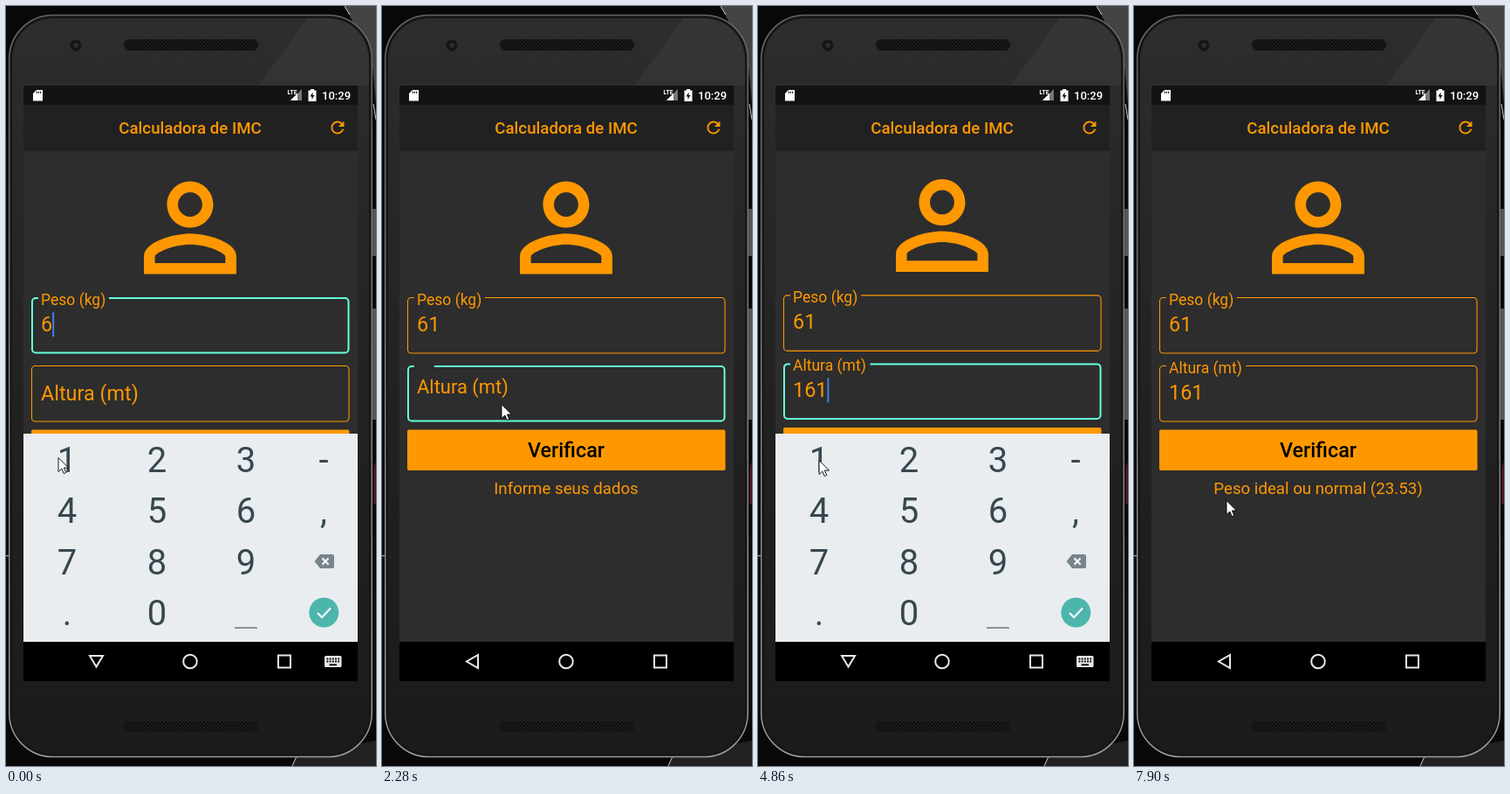
Recreate the animation shown at these times as an HTML page. Size 424 by 869 pixels, loop 8000 ms.

```html
<!DOCTYPE html>
<html lang="pt">
<head>
<meta charset="utf-8">
<title>Calculadora de IMC</title>
<style>
html, body { margin: 0; width: 100%; height: 100%; overflow: hidden; background: #080808; }
svg { display: block; }
text { font-family: Roboto, sans-serif; white-space: pre; }
.orange { fill: #ff9800; }
.big { font-size: 23.4px; }
.mid { font-size: 18.7px; }
.medium { font-weight: 500; }
.center, #keys text { text-anchor: middle; }
.line { fill: none; stroke: #e8e8e8; stroke-width: 2; }
#keys text { font-size: 40px; fill: #37474f; }
</style>
</head>
<body>
<svg width="424" height="869" viewBox="0 0 424 869">
  <defs>
    <linearGradient id="shell" x1="0" y1="0" x2="0" y2="1">
      <stop offset="0" stop-color="#2d2d2d"/>
      <stop offset=".5" stop-color="#222"/>
      <stop offset="1" stop-color="#1b1b1b"/>
    </linearGradient>
    <linearGradient id="rim" x1="0" y1="0" x2="0" y2="1">
      <stop offset="0" stop-color="#666"/>
      <stop offset="1" stop-color="#999"/>
    </linearGradient>
    <pattern id="mesh" width="4" height="4" patternUnits="userSpaceOnUse">
      <rect width="4" height="4" fill="#1c1c1c"/>
      <circle cx="1" cy="1" r="1" fill="#080808"/>
      <circle cx="3" cy="3" r="1" fill="#080808"/>
    </pattern>
  </defs>

  <!-- backdrop and phone -->
  <path d="M388 0H424V112L419 60Z" fill="#444"/>
  <path d="M333 858L328 869H424V840Z" fill="#222"/>
  <path d="M388 0L394 10M421 112L424 130M333 858L328 869M0 629L4 628" stroke="#ccc" fill="none"/>
  <path d="M421 530L424 520V570H421Z" fill="#4a1420"/>
  <path d="M420 232h4v54h-4zM420 346h4v127h-4z" fill="#555"/>
  <rect x="3.7" y="10.5" width="415.5" height="848" rx="50" fill="#161616" stroke="url(#rim)" stroke-width="1.5"/>
  <rect x="7" y="14" width="409" height="841" rx="47" fill="url(#shell)"/>
  <path d="M345 14L290 91H416V61Q410 16 369 14Z" fill="#fff" opacity=".04"/>
  <circle cx="80" cy="45" r="6.5" fill="#151515"/>
  <circle cx="80" cy="45" r="3" fill="#2c2c2c"/>
  <rect x="135" y="38" width="154" height="13" rx="6" fill="url(#mesh)"/>
  <rect x="135" y="818" width="154" height="12" rx="6" fill="url(#mesh)"/>

  <!-- app -->
  <rect x="20" y="91" width="383" height="681" fill="#2d2d2d"/>
  <g id="content">
    <path class="orange" fill-rule="evenodd" transform="translate(131.5 174) scale(6.625)" d="M12 5.9c1.16 0 2.1.94 2.1 2.1s-.94 2.1-2.1 2.1S9.9 9.16 9.9 8s.94-2.1 2.1-2.1m0 9c2.97 0 6.1 1.46 6.1 2.1v1.1H5.9V17c0-.64 3.13-2.1 6.1-2.1M12 4C9.79 4 8 5.79 8 8s1.79 4 4 4 4-1.79 4-4-1.79-4-4-4zm0 9c-2.67 0-8 1.34-8 4v3h16v-3c0-2.66-5.33-4-8-4z"/>
    <g id="weight"></g>
    <g id="height"></g>
    <rect class="orange" x="29" y="484.5" width="364.5" height="46.5" rx="2"/>
    <text class="big medium center" x="211" y="516">Verificar</text>
    <text id="result" class="mid orange center" x="211" y="558"></text>
  </g>

  <rect x="20" y="113" width="383" height="52.5" fill="#212121"/>
  <text class="mid medium orange center" x="211" y="146">Calculadora de IMC</text>
  <path class="orange" transform="translate(368.8 127.8) scale(.932)" d="M17.65 6.35C16.2 4.9 14.21 4 12 4c-4.42 0-7.99 3.58-7.99 8s3.57 8 7.99 8c3.73 0 6.84-2.55 7.73-6h-2.08c-.82 2.33-3.04 4-5.65 4-3.31 0-6-2.69-6-6s2.69-6 6-6c1.66 0 3.14.69 4.22 1.78L13 11h7V4l-2.35 2.35z"/>

  <!-- status bar -->
  <rect x="20" y="91" width="383" height="22" fill="#131313"/>
  <path d="M35 96H42V108.500H31V100Z" fill="#fff"/>
  <path d="M35.500 97.500v2.500M37.500 97.500v2.500M39.500 97.500v2.500" stroke="#131313"/>
  <path d="M339 95V108H326Z" fill="#777"/>
  <path d="M334 100V108H326Z" fill="#fff"/>
  <text x="322.500" y="100.500" font-size="6.800" font-weight="700" fill="#fff">LTE</text>
  <path d="M349 95h4v1.500h2.500V109h-9V96.500h2.500Z" fill="#fff"/>
  <path d="M351.500 98.500L348.500 103.500H350.500V107L353.500 102H351.500Z" fill="#131313"/>
  <text class="medium" x="362" y="107" font-size="13.050" fill="#fff">10:29</text>

  <!-- keyboard -->
  <svg x="20" y="489" width="383" height="238" viewBox="20 489 383 238">
    <g id="keyboard">
      <rect x="20" y="489" width="383" height="238" fill="#e9edf0"/>
      <g id="keys"></g>
      <path d="M262 711h26" stroke="#8b969b" stroke-width="2"/>
      <path d="M360 627H374Q376 627 376 629V641Q376 643 374 643H360L353.500 635Z" fill="#78868c"/>
      <path d="M362.500 631.500l7 7M369.500 631.500l-7 7" stroke="#fff" stroke-width="2"/>
      <circle id="done" cx="364.300" cy="693.500" r="17"/>
      <path d="M357 694l5 5 10-10.500" fill="none" stroke="#fff" stroke-width="2"/>
    </g>
  </svg>

  <!-- navigation bar -->
  <rect x="20" y="727" width="383" height="45"/>
  <path id="back" class="line"/>
  <circle class="line" cx="211" cy="749.500" r="7.800"/>
  <rect class="line" x="312" y="742.500" width="14" height="14"/>
  <g id="imeIcon">
    <rect x="365" y="743" width="19.500" height="13" rx="1.500" fill="#e8e8e8"/>
    <path d="M367.500 746.500h15M367.500 749.500h15" stroke="#000" stroke-width="1.800" stroke-dasharray="1.800 1.400"/>
    <path d="M370.500 753.300h8.500" stroke="#000" stroke-width="1.800"/>
  </g>

  <path id="mouse" d="M0 .5V16.500L3.800 13L6.200 18.600L8.800 17.500L6.400 12H11.500Z" fill="#fff" stroke="#000" stroke-width=".9"/>
</svg>
<script>
const $ = id => document.getElementById(id);
const LOOP = 8000, STEP = 150;   // the screen refreshes every STEP ms

const ramp = (t, from, to) => Math.min(1, Math.max(0, (t - from) / (to - from)));
const within = (t, from, to) => t >= from && t < to;
const move = (id, x, y) => $(id).setAttribute("transform", `translate(${x} ${y})`);

// mouse: starting place, then [leave, arrive, x, y]
const start = [60, 516];
const moves = [
  [300, 750, 363, 697],    // done
  [1350, 1950, 137, 455],  // height field
  [2550, 3000, 88, 514],   // key 1
  [3300, 3750, 291, 584],  // key 6
  [4200, 4650, 70, 519],   // key 1
  [4950, 5550, 363, 697],  // done
  [6150, 6750, 220, 512],  // check button
  [7650, 7800, 106, 565],
];

function mouseAt(t) {
  let [x, y] = start;
  for (const [leave, arrive, toX, toY] of moves) {
    const k = ramp(t, leave, arrive);
    x += (toX - x) * k;
    y += (toY - y) * k;
  }
  return [Math.round(x), Math.round(y)];
}

const columns = [70, 173, 275, 364];
$("keys").innerHTML = ["123-", "456,", "789", ".0"].map((row, r) => [...row].map((key, i) =>
  `<text x="${columns[i]}" y="${532.5 + 58.5 * r}">${key}</text>`).join("")).join("");

// up: how far the label has floated, 0 to 1
function field(y, label, gap, value, focused, caret, up) {
  const inset = focused ? .5 : 0;
  return `<rect x="${29.5 + inset}" y="${y + .5 + inset}" width="${363.5 - 2 * inset}" height="${63.5 - 2 * inset}" rx="4"
      fill="none" stroke="${focused ? "#64ffda" : "#ff9800"}" stroke-width="${focused ? 2 : 1.1}"/>
    <rect x="37" y="${y - 2}" width="${gap * up}" height="5" fill="#2d2d2d"/>
    <text class="orange" x="40" y="${y + 40.3 - 31.3 * up}" font-size="${23.4 - 5.85 * up}">${label}</text>
    <text class="orange big" x="40" y="${y + 39}">${value}</text>` +
    (caret ? `<rect x="${40.2 + 13.1 * value.length}" y="${y + 17}" width="1.8" height="28" fill="#4285f4"/>` : "");
}

function draw(t) {
  const weight = t < 300 ? "6" : "61";
  const keyTimes = [3300, 4050, 4800].filter(k => t >= k);
  const height = "161".slice(0, keyTimes.length);
  const blink = since => (t - since) % 1000 < 500;

  $("weight").innerHTML = field(333, "Peso (kg)", 81, weight, t < 1200,
    t < 900 && blink(t < 300 ? 0 : 300), 1);
  $("height").innerHTML = field(411, "Altura (mt)", 91.5, height, within(t, 2250, 6150),
    within(t, 2400, 5850) && blink(keyTimes.at(-1) ?? 2400), ramp(t, 2200, 2400));
  $("result").textContent = t < 7050 ? "Informe seus dados" : "Peso ideal ou normal (23.53)";

  move("content", 0, -2.6 * (ramp(t, 2775, 3675) - ramp(t, 5850, 6250)));
  const hidden = ramp(t, 900, 1200) - ramp(t, 2400, 2700) + ramp(t, 5850, 6100);
  move("keyboard", 0, 238 * hidden);
  const open = hidden < .4;
  $("back").setAttribute("d", open ? "M96 743H111L103.5 755.5Z" : "M110 742V757L97 749.5Z");
  $("imeIcon").style.display = open ? "" : "none";
  const pressed = within(t, 900, 1050) || within(t, 5850, 6000);
  $("done").setAttribute("fill", pressed ? "#80cbc4" : "#4db6ac");
  move("mouse", ...mouseAt(t));
}

function loop() {
  const now = performance.now() % LOOP;
  draw(Math.floor(now / STEP) * STEP);
  requestAnimationFrame(loop);
}
loop();
</script>
</body>
</html>
```
